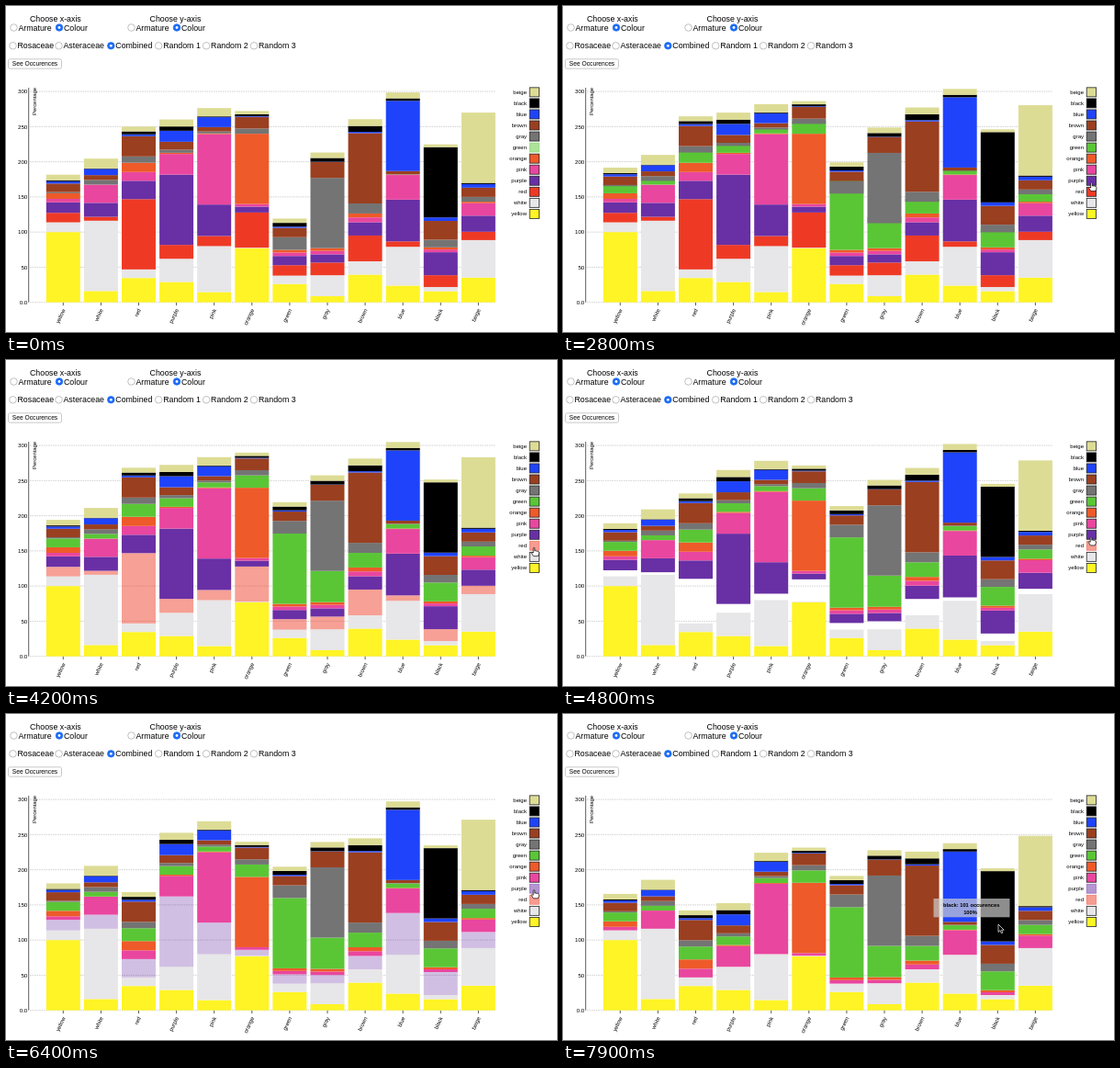
An HTML page with a canvas that plays this animation: 600 px wide and 355 px high, repeating every 8000 ms.

```html
<!DOCTYPE html>
<html lang="en">
<head>
<meta charset="utf-8">
<title>Stacked colour chart</title>
<style>
html, body { margin: 0; width: 100%; height: 100%; overflow: hidden; background: #fff; }
canvas, svg { position: absolute; left: 0; top: 0; width: 600px; height: 355px; }
text { font-family: "Liberation Sans", Arial, sans-serif; fill: #000; }
</style>
</head>
<body>
<canvas id="chart"></canvas>
<svg id="ui" viewBox="0 0 600 355"></svg>
<script>
const LOOP = 8000, STEP = 635;
const BASE = 322.7, UNIT = 0.7655;

// Each colour: fill, then how many plants have it together with
// the colours before it and, last, in total.
const COLOURS = {
  yellow: ['#fff425', 1050],
  white: ['#e7e6e8', 145, 900],
  red: ['#ee3a25', 142, 50, 410],
  purple: ['#692fa5', 157, 179, 107, 542],
  pink: ['#e9469f', 52, 232, 51, 159, 355],
  orange: ['#ee5a29', 83, 1, 54, 9, 4, 108],
  green: ['#5ac636', 132, 60, 75, 66, 25, 19, 505],
  gray: ['#747474', 18, 61, 37, 24, 10, 8, 91, 205],
  brown: ['#9a3f20', 127, 61, 118, 61, 22, 18, 67, 46, 322],
  blue: ['#1f43fa', 34, 79, 11, 85, 50, 1, 9, 1, 6, 143],
  black: ['#000', 16, 6, 17, 33, 4, 3, 27, 11, 27, 5, 101],
  beige: ['#dddc95', 83, 126, 28, 54, 42, 5, 31, 16, 31, 12, 4, 236]
};
const NAMES = Object.keys(COLOURS);
const FILLS = NAMES.map(name => COLOURS[name][0]);
const shared = (a, b) => COLOURS[NAMES[Math.max(a, b)]][Math.min(a, b) + 1];
const percent = (bar, c) => 100 * shared(bar, c) / shared(bar, bar);

const TOGGLES = {
  green: { at: 1765, on: true },
  red: { at: 3880, on: false },
  purple: { at: 6035, on: false }
};
// Pointer stops: time, x, y
const PATH = [[300, 606, 150], [900, 575.5, 153], [1800, 575.5, 156], [2800, 575.5, 192],
  [3600, 575, 204], [4300, 575, 204], [5200, 575, 183], [6000, 575, 189],
  [7250, 575, 196], [7700, 474, 229]];

const svg = document.getElementById('ui');
const canvas = document.getElementById('chart');
const ratio = window.devicePixelRatio || 1;
canvas.width = 600 * ratio;
canvas.height = 355 * ratio;
const ctx = canvas.getContext('2d');
ctx.scale(ratio, ratio);

function add(tag, attrs, parent = svg) {
  const el = document.createElementNS('http://www.w3.org/2000/svg', tag);
  for (const key in attrs) el.setAttribute(key, attrs[key]);
  parent.appendChild(el);
  return el;
}

function label(str, x, y, size, attrs = {}, parent = svg) {
  add('text', { x, y, 'font-size': size, ...attrs }, parent).textContent = str;
}

function radio(x, y, str, on) {
  add('circle', { cx: x, cy: y, r: 3.8, fill: on ? '#1d6cf5' : '#fff',
    stroke: on ? '#1d6cf5' : '#a5a5a5', 'stroke-width': 0.7 });
  if (on) add('circle', { cx: x, cy: y, r: 1.4, fill: '#fff' });
  label(str, x + 5, y + 3, 8.8);
}

const clamp = v => Math.max(0, Math.min(1, v));
const ease = v => v < 0.5 ? 4 * v ** 3 : 1 - 4 * (1 - v) ** 3;
const barX = i => 43.8 + 41.1 * i;
const legendY = i => 226.4 - 12.05 * i;

// Controls
['x', 'y'].forEach((axis, i) => {
  const x = 128 * i;
  label(`Choose ${axis}-axis`, 26 + x * 1.02, 16.7, 8.8);
  radio(8.5 + x, 23.5, 'Armature', false);
  radio(58 + x, 23.5, 'Colour', true);
});
['Rosaceae', 'Asteraceae', 'Combined', 'Random 1', 'Random 2', 'Random 3']
  .forEach((name, i) => radio(i < 2 ? 7.5 + 50 * i : 10.5 + 51.9 * i, 43.3, name, i === 2));
add('rect', { x: 2.5, y: 57.8, width: 58, height: 10.4, rx: 2, fill: '#fff',
  stroke: '#bcbcbc', 'stroke-width': 0.8 });
label('See Occurences', 31.5, 65.4, 6.7, { 'text-anchor': 'middle' });

// Axes and legend names
for (let v = 0; v <= 300; v += 50)
  label(v || '0.0', 23.3, BASE - v * UNIT + 2.2, 6.2, { 'text-anchor': 'end' });
label('Percentage', 0, 0, 5.9, { transform: 'translate(33 119) rotate(-90)' });
NAMES.forEach((name, i) => {
  label(name, 0, 0, 6, { 'text-anchor': 'end',
    transform: `translate(${barX(i) + 21} 331) rotate(-65)` });
  label(name, 567, legendY(i) + 2, 6, { 'text-anchor': 'end' });
});

// Tooltip
const tip = add('g', {});
add('rect', { x: 403.5, y: 201, width: 83, height: 20.3, fill: '#d2d2d2', 'fill-opacity': 0.68 }, tip);
const bold = { 'text-anchor': 'middle', 'font-weight': 'bold' };
label('black: 101 occurences', 444.7, 210, 5.75, bold, tip);
label('100%', 443.5, 217.6, 5.75, bold, tip);

// Pointers, both with the tip at 0,0
const ink = { stroke: '#fff', 'stroke-width': 0.7, fill: '#000', 'stroke-linejoin': 'round' };
const arrow = add('path', { ...ink, d: 'M0 0V8.5L2 6.7 3.4 9.8 4.9 9.1 3.5 6.2H6.2Z' });
const hand = add('path', { ...ink, fill: '#fff', stroke: '#000',
  d: 'M-.8 .8Q0 -.4 .8 .8V4Q1.8 3.2 2.4 4.2 3.4 3.5 4 4.5 5.2 4 5.4 5.3V7.2L4.3 9.6H-.6L-2.8 6.2Q-3 4.7 -.8 6Z' });

function pointer(t) {
  let k = 1;
  while (k < PATH.length - 1 && t > PATH[k][0]) k++;
  const [t0, x0, y0] = PATH[k - 1], [t1, x1, y1] = PATH[k];
  const u = clamp((t - t0) / (t1 - t0));
  return [x0 + (x1 - x0) * u, y0 + (y1 - y0) * u];
}

// Opacity, space taken in the stack, and legend state of a layer
function layer(name, t) {
  const tg = TOGGLES[name];
  if (!tg) return { alpha: 1, space: 1, on: true };
  const fade = ease(clamp((t - tg.at) / STEP));
  const move = ease(clamp((t - tg.at - STEP) / STEP));
  return { alpha: tg.on ? fade : 1 - fade, space: tg.on ? move : 1 - move,
    on: (t >= tg.at) === tg.on };
}

function line(x0, y0, x1, y1) {
  ctx.beginPath();
  ctx.moveTo(x0, y0);
  ctx.lineTo(x1, y1);
  ctx.stroke();
}

function drawAxes() {
  ctx.lineWidth = 0.8;
  ctx.strokeStyle = '#c4c4c4';
  ctx.setLineDash([1.5, 1]);
  for (let v = 0; v <= 300; v += 50) line(26, BASE - v * UNIT, 533, BASE - v * UNIT);
  ctx.setLineDash([]);
  ctx.strokeStyle = '#333';
  line(24.7, 89, 24.7, BASE);
  NAMES.forEach((name, i) => line(barX(i) + 18.5, BASE, barX(i) + 18.5, BASE + 3.5));
}

function draw(t) {
  ctx.globalAlpha = 1;
  ctx.clearRect(0, 0, 600, 355);
  drawAxes();
  const layers = NAMES.map(name => layer(name, t));
  NAMES.forEach((name, bar) => {
    let y = BASE;
    layers.forEach((l, c) => {
      const h = percent(bar, c) * UNIT;
      ctx.globalAlpha = l.alpha;
      ctx.fillStyle = FILLS[c];
      ctx.fillRect(barX(bar), y - h, 37, h);
      y -= h * l.space;
    });
  });
  layers.forEach((l, c) => {
    ctx.globalAlpha = l.on ? 1 : 0.5;
    ctx.fillStyle = FILLS[c];
    ctx.strokeStyle = l.on ? '#222' : FILLS[c];
    ctx.fillRect(570.2, legendY(c) - 5, 10.4, 10);
    ctx.strokeRect(570.2, legendY(c) - 5, 10.4, 10);
  });

  const [x, y] = pointer(t);
  const over = x > 570 && x < 581 && NAMES.some((n, i) => Math.abs(y - legendY(i)) < 5);
  const place = `translate(${x} ${y})`;
  arrow.setAttribute('transform', place);
  hand.setAttribute('transform', place);
  arrow.style.display = over ? 'none' : '';
  hand.style.display = over ? '' : 'none';
  tip.style.display = t >= 7700 ? '' : 'none';
}

const start = performance.now();
function frame(now) {
  draw(Math.max(0, now - start) % LOOP);
  requestAnimationFrame(frame);
}
draw(0);
requestAnimationFrame(frame);
</script>
</body>
</html>
```
